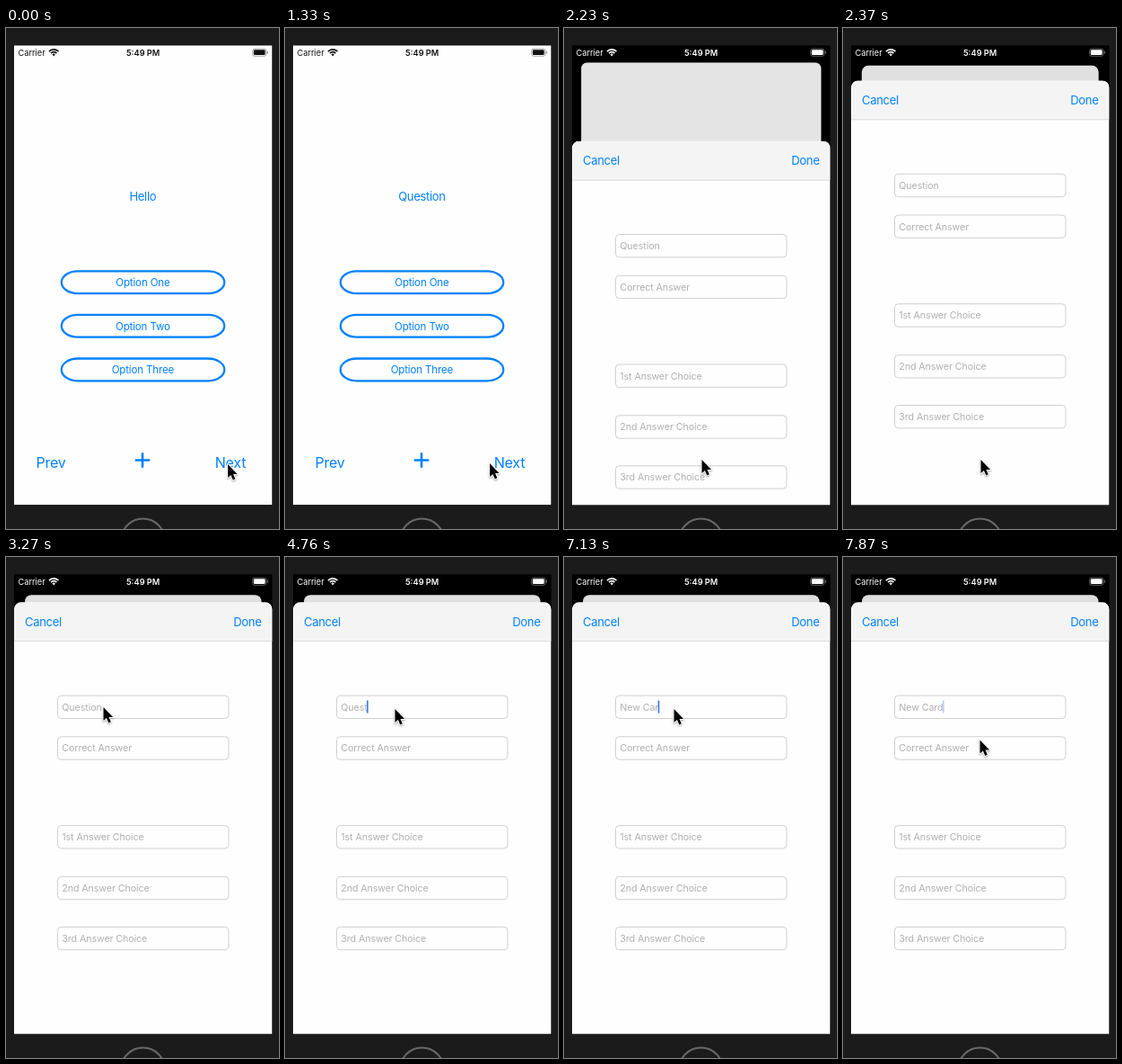
Write an HTML page with a canvas that moves like this. It is 304 by 557 pixels and loops after 8000 ms.

```html
<!DOCTYPE html>
<html lang="en">
<head>
<meta charset="utf-8">
<title>Quiz card editor</title>
<style>
  html, body { margin: 0; width: 100%; height: 100%; overflow: hidden; background: #1b1b1b; }
  canvas { display: block; width: 304px; height: 557px; }
</style>
</head>
<body>
<canvas id="stage"></canvas>
<script>
const W = 304, H = 557, LOOP = 8000, TICK = 148.45;
const SCREEN = { x: 9, y: 19.3, w: 287.5, h: 511 };
const BLUE = '#0080ff', GREY = '#b0b0b0';
const FONT = 'Inter, Roboto, sans-serif';

const canvas = document.getElementById('stage');
const ctx = canvas.getContext('2d');
const dpr = window.devicePixelRatio || 1;
canvas.width = W * dpr;
canvas.height = H * dpr;

// Pointer keys: tick, x, y
const POINTER = [
  [0, 247, 485], [6, 247, 485], [7, 246, 485], [8, 246, 485], [9, 228, 484],
  [10, 190, 482], [11, 161, 480], [12, 153.5, 480], [17, 153.5, 480],
  [18, 152, 455], [19, 141, 362], [20, 122, 236], [21, 110.5, 176],
  [22, 108.5, 167], [23, 108.5, 167], [25, 122.5, 169], [49, 122.5, 169],
  [50, 126, 172], [51, 139, 188], [52, 151, 202], [53, 152.5, 203.5]
];

// Field edits: tick, text
const EDITS = [
  [0, 'Question'], [30, 'Questio'], [31, 'Questi'], [32, 'Quest'], [33, 'Ques'],
  [35, 'Que'], [36, 'Qu'], [37, 'Q'], [38, ''], [42, 'Ne'], [43, 'New'],
  [44, 'New '], [46, 'New C'], [47, 'New Ca'], [48, 'New Car'], [49, 'New Card']
];

const latest = (keys, k) => keys.filter(key => key[0] <= k).pop();

function pointerAt(k) {
  const a = latest(POINTER, k);
  const b = POINTER[POINTER.indexOf(a) + 1] || a;
  const u = a === b ? 0 : (k - a[0]) / (b[0] - a[0]);
  return [a[1] + (b[1] - a[1]) * u, a[2] + (b[2] - a[2]) * u];
}

// Critically damped spring, 0 to 1
function sheetProgress(k) {
  if (k < 14) return 0;
  const s = 18.26 * ((k - 14) * 0.1484 + 0.033);
  return 1 - (1 + s) * Math.exp(-s);
}

function caretAlpha(k) {
  if (k < 24 || k === 29) return 0;
  return k === 28 || k === 53 ? 0.35 : 1;
}

// y is the middle of the capitals
function text(str, x, y, size, color, { align = 'left', weight = 400, space = 0 } = {}) {
  ctx.font = `${weight} ${size}px ${FONT}`;
  ctx.letterSpacing = space + 'px';
  ctx.textAlign = align;
  ctx.fillStyle = color;
  ctx.fillText(str, x, y + size * 0.364);
  return ctx.measureText(str).width;
}

function box(x, y, w, h, r) {
  ctx.beginPath();
  ctx.roundRect(x, y, w, h, r);
}

function statusBar(color) {
  text('Carrier', 13.6, 27.5, 9.2, color);
  text('5:49 PM', 152.6, 27.5, 9.2, color, { align: 'center', weight: 600 });

  ctx.strokeStyle = color;
  ctx.lineWidth = 1.7;
  for (const r of [4.3, 7.2]) {
    ctx.beginPath();
    ctx.arc(53.2, 31, r, -Math.PI * 0.76, -Math.PI * 0.24);
    ctx.stroke();
  }
  ctx.fillStyle = color;
  ctx.beginPath();
  ctx.moveTo(53.2, 31.4);
  ctx.arc(53.2, 31, 2.4, -Math.PI * 0.76, -Math.PI * 0.24);
  ctx.fill();

  ctx.lineWidth = 0.7;
  box(274.6, 23.1, 15.2, 8.2, 2.3);
  ctx.globalAlpha = 0.5;
  ctx.stroke();
  ctx.fillRect(290.7, 25.7, 1, 3);
  ctx.globalAlpha = 1;
  box(275.8, 24.3, 12.8, 5.8, 1.3);
  ctx.fill();
}

function plus(x, y) {
  ctx.strokeStyle = BLUE;
  ctx.lineWidth = 2.6;
  ctx.lineCap = 'round';
  ctx.beginPath();
  ctx.moveTo(x - 7.2, y);
  ctx.lineTo(x + 7.2, y);
  ctx.moveTo(x, y - 7.2);
  ctx.lineTo(x, y + 7.2);
  ctx.stroke();
  ctx.lineCap = 'butt';
}

function quizView(k, p) {
  const cx = SCREEN.x + SCREEN.w / 2, cy = SCREEN.y + SCREEN.h / 2;
  const scale = 1 - 0.084 * p;
  ctx.save();
  ctx.translate(cx, cy + 1.4 * p);
  ctx.scale(scale, scale);
  ctx.translate(-cx, -cy);
  box(SCREEN.x, SCREEN.y, SCREEN.w, SCREEN.h, 8 * p);
  ctx.fillStyle = '#fefefe';
  ctx.fill();

  text(k < 6 ? 'Hello' : 'Question', 152.4, 187, 13, BLUE, { align: 'center', space: -0.3 });
  ['One', 'Two', 'Three'].forEach((name, i) => {
    const y = 282.7 + i * 48.6;
    box(61.8, y - 12.4, 181.4, 24.8, { x: 18, y: 12.4 });
    ctx.strokeStyle = BLUE;
    ctx.lineWidth = 2.3;
    ctx.stroke();
    text('Option ' + name, 152.4, y + 0.2, 11.5, BLUE, { align: 'center', space: -0.13 });
  });

  text('Prev', 33.6, 483, 16, BLUE, { space: -0.3 });
  ctx.globalAlpha = { 5: 0.3, 6: 0.65 }[k] || 1;
  text('Next', 267.2, 483, 16, BLUE, { align: 'right', space: -0.2 });
  ctx.globalAlpha = k === 12 || k === 13 ? 0.25 : 1;
  plus(152, 480.5);
  ctx.globalAlpha = 1;

  box(SCREEN.x, SCREEN.y, SCREEN.w, SCREEN.h, 8 * p);
  ctx.fillStyle = `rgba(0,0,0,${0.12 * p})`;
  ctx.fill();
  ctx.restore();
}

function editSheet(k, p) {
  const top = 530.3 - 480 * p;
  ctx.save();
  box(SCREEN.x, top, SCREEN.w, 520, [8, 8, 0, 0]);
  ctx.clip();
  ctx.fillStyle = '#fefefe';
  ctx.fillRect(0, top, W, 520);
  ctx.fillStyle = '#f4f4f4';
  ctx.fillRect(0, top, W, 43);
  ctx.fillStyle = '#cfcfcf';
  ctx.fillRect(0, top + 43, W, 0.8);
  text('Cancel', 21, top + 21.7, 13, BLUE, { space: -0.3 });
  text('Done', 284.5, top + 21.7, 13, BLUE, { align: 'right', space: -0.3 });

  const entry = latest(EDITS, k)[1];
  const fields = [
    [116.5, entry], [162.2, 'Correct Answer'], [261, '1st Answer Choice'],
    [317.8, '2nd Answer Choice'], [373.7, '3rd Answer Choice']
  ];
  fields.forEach(([dy, label], i) => {
    const y = top + dy;
    box(57.5, y - 12.7, 190.4, 25.4, 4);
    ctx.strokeStyle = '#cbcbcb';
    ctx.lineWidth = 0.9;
    ctx.stroke();
    const width = text(label, 62.3, y, 10.7, GREY, { space: -0.1 });
    if (i === 0) {
      ctx.globalAlpha = caretAlpha(k);
      ctx.fillStyle = '#3f73ee';
      ctx.fillRect(61.7 + width, y - 7.3, 1.6, 14);
      ctx.globalAlpha = 1;
    }
  });
  ctx.restore();
}

function pointer(x, y) {
  const arrow = [[0, 0], [0, 15], [3.4, 11.9], [5.8, 17.4], [8.3, 16.3], [6, 11], [10.6, 11]];
  ctx.save();
  ctx.translate(x, y);
  ctx.beginPath();
  arrow.forEach(([px, py]) => ctx.lineTo(px, py));
  ctx.closePath();
  ctx.lineJoin = 'round';
  ctx.strokeStyle = '#fff';
  ctx.lineWidth = 2;
  ctx.shadowColor = 'rgba(0,0,0,0.35)';
  ctx.shadowBlur = 2 * dpr;
  ctx.shadowOffsetY = dpr;
  ctx.stroke();
  ctx.shadowColor = 'transparent';
  ctx.fillStyle = '#000';
  ctx.fill();
  ctx.restore();
}

function draw(time) {
  const k = Math.floor((time % LOOP + 6) / TICK);
  const p = sheetProgress(k);
  ctx.setTransform(dpr, 0, 0, dpr, 0, 0);

  ctx.fillStyle = '#1b1b1b';
  ctx.fillRect(0, 0, W, H);
  ctx.strokeStyle = '#686868';
  ctx.lineWidth = 2;
  ctx.beginPath();
  ctx.arc(152.5, 570, 24.5, 0, Math.PI * 2);
  ctx.stroke();

  ctx.save();
  ctx.beginPath();
  ctx.rect(SCREEN.x, SCREEN.y, SCREEN.w, SCREEN.h);
  ctx.clip();
  ctx.fillStyle = '#000';
  ctx.fillRect(0, 0, W, H);
  quizView(k, p);
  statusBar(k < 15 ? '#111' : '#fff');
  if (p > 0) editSheet(k, p);
  ctx.restore();

  pointer(...pointerAt(k));
}

const start = performance.now();
function loop() {
  draw(performance.now() - start);
  requestAnimationFrame(loop);
}
loop();
</script>
</body>
</html>
```
